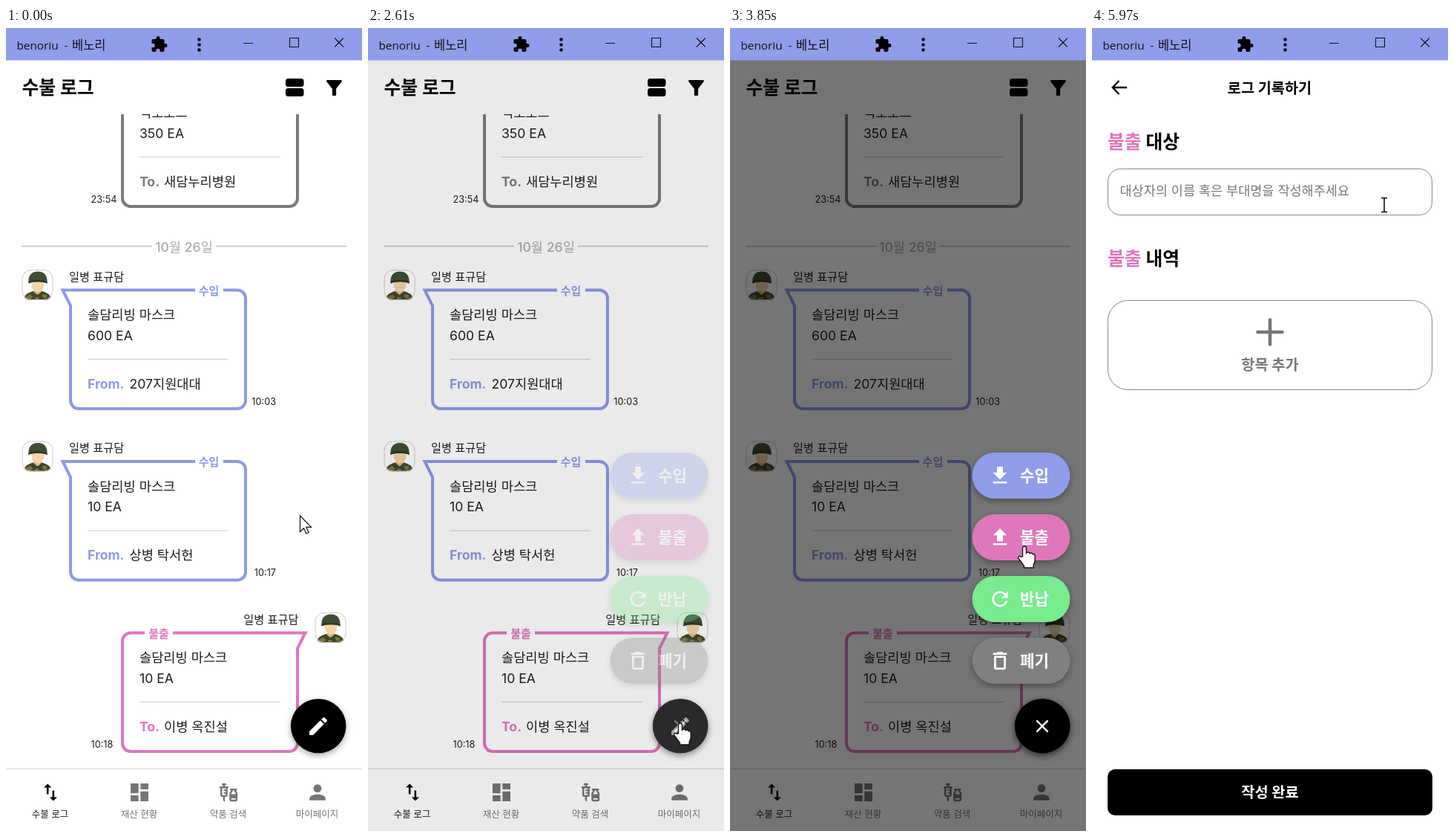
An HTML page that plays this animation: 480 by 1080 pixels, repeating every 6 s.

```html
<!DOCTYPE html>
<html lang="ko">
<head>
<meta charset="utf-8">
<style>
html, body { margin: 0; width: 100%; height: 100%; overflow: hidden; background: #fff }
svg { display: block; width: 480px; height: 1080px }
text { font-family: Inter, "Noto Sans CJK KR", "Noto Sans CJK", sans-serif; white-space: pre }
.win { font-family: "Open Sans", "Noto Sans CJK KR", "Noto Sans CJK", sans-serif }
.raised { filter: drop-shadow(0 3px 4px rgba(0, 0, 0, .35)) }
.line { fill: none }
</style>
</head>
<body>
<svg id="stage" viewBox="0 0 480 1080"></svg>
<script>
const BLUE = '#8c9ae8', PINK = '#e075bf', GRAY = '#7b7b7b', INK = '#1c1c1c';

const ICON = {
  puzzle: 'M20.5 11H19V7c0-1.1-.9-2-2-2h-4V3.5a2.5 2.5 0 0 0-5 0V5H4c-1.1 0-2 .9-2 2v3.8h1.5a2.7 2.7 0 0 1 0 5.4H2V20c0 1.1.9 2 2 2h3.8v-1.5a2.7 2.7 0 0 1 5.4 0V22H17c1.1 0 2-.9 2-2v-4h1.5a2.5 2.5 0 0 0 0-5z',
  filter: 'M4.25 5.61C6.27 8.2 10 13 10 13v6c0 .55.45 1 1 1h2c.55 0 1-.45 1-1v-6s3.72-4.8 5.74-7.39A1 1 0 0 0 18.95 4H5.04a1 1 0 0 0-.79 1.61z',
  swap: 'M16 17V10h-2v7h-3l4 4 4-4zM9 3L5 7h3v7h2V7h3z',
  board: 'M3 13h8V3H3zm0 8h8v-6H3zm10 0h8V11h-8zm0-18v6h8V3z',
  vaccine: 'M11 5.5H8V4h.5a1 1 0 0 0 0-2h-3a1 1 0 0 0 0 2H6v1.5H3a1 1 0 0 0 0 2V15c0 1.1.9 2 2 2h1v4l2 1.5V17h1c1.1 0 2-.9 2-2V7.5a1 1 0 0 0 0-2zM9 9H7.25a.75.75 0 0 0 0 1.5H9V12H7.25a.75.75 0 0 0 0 1.5H9V15H5V7.5h4zM20.5 10.5V10a1 1 0 0 0 0-2h-6a1 1 0 0 0 0 2v.5c0 .5-1.5 1.2-1.5 3V20c0 1.1.9 2 2 2h5c1.1 0 2-.9 2-2v-6.5c0-1.8-1.5-2.5-1.5-3zM16.5 10.5V10h2v.5c0 1.6 1.5 2 1.5 3V14h-5v-.5c0-1 1.5-1.4 1.5-3zM15 20v-1.5h5V20z',
  person: 'M12 12a4 4 0 1 0 0-8 4 4 0 0 0 0 8zm0 2c-2.67 0-8 1.34-8 4v2h16v-2c0-2.66-5.33-4-8-4z',
  pencil: 'M3 17.25V21h3.75L17.81 9.94l-3.75-3.75zM20.71 7.04a1 1 0 0 0 0-1.41l-2.34-2.34a1 1 0 0 0-1.41 0l-1.83 1.83 3.75 3.75z',
  close: 'M19 6.4L17.6 5 12 10.6 6.4 5 5 6.4l5.6 5.6L5 17.6 6.4 19l5.6-5.6 5.6 5.6 1.4-1.4-5.6-5.6z',
  down: 'M19 9h-4V3H9v6H5l7 7zM5 18v2h14v-2z',
  up: 'M9 16h6v-6h4l-7-7-7 7h4zM5 18h14v2H5z',
  redo: 'M17.65 6.35A8 8 0 1 0 19.73 14h-2.08A6 6 0 1 1 12 6c1.66 0 3.14.69 4.22 1.78L13 11h7V4z',
  trash: 'M6 19c0 1.1.9 2 2 2h8c1.1 0 2-.9 2-2V7H6zM8 9h8v10H8zm7.5-5l-1-1h-5l-1 1H5v2h14V4z'
};

// Text placed by its vertical centre
const text = (s, x, y, size, fill = INK, weight = 400, anchor = 'start', cls = '') =>
  `<text class="${cls}" x="${x}" y="${y + size * .37}" font-size="${size}" fill="${fill}" font-weight="${weight}" text-anchor="${anchor}">${s}</text>`;
const icon = (name, x, y, scale, fill) =>
  `<path d="${ICON[name]}" fill="${fill}" fill-rule="evenodd" transform="translate(${x} ${y}) scale(${scale}) translate(-12 -12)"/>`;
const rect = (x, y, w, h, fill, r = 0, more = '') =>
  `<rect x="${x}" y="${y}" width="${w}" height="${h}" rx="${r}" fill="${fill}" ${more}/>`;
const line = (d, color, width, more = '') =>
  `<path class="line" d="${d}" stroke="${color}" stroke-width="${width}" ${more}/>`;

const avatar = (x, y) => `<g transform="translate(${x} ${y})">
  <g clip-path="url(#round)">
    ${rect(0, 0, 42, 41, '#fff')}
    <path d="M3 41c0-7 3-9 12-12h12c9 3 12 5 12 12z" fill="#3c4729"/>
    <path d="M5 37l6-4 4 4-5 4zM27 33l7 1-1 5-5-1zM18 37h5v4h-6z" fill="#82713f"/>
    <path d="M16 25h10v5l-5 4-5-4z" fill="#dfb98a"/>
    <ellipse cx="21.5" cy="20" rx="8.5" ry="10" fill="#f3d5a8"/>
    <path d="M9 18.500C8 8 13 2.500 21.500 2.500S35 8 34 18.500c-7-3-18-3-25 0z" fill="#3f4d35"/>
    <path d="M9 18.500c7-3 18-3 25 0V16c-7-3-18-3-25 0z" fill="#2d3826"/>
  </g>
  ${rect(.5, .5, 41, 40, 'none', 12, 'stroke="#ccc"')}
</g>`;

// Speech bubble; the outgoing kind is mirrored to the right
function bubble(dy, color, label, name, item, count, who, time, out) {
  const x = out ? 180 : 110;
  return `<g transform="translate(0 ${dy})">
    ${line('M255 352.5H76.5L87 373.5V501a11 11 0 0 0 11 11H312a11 11 0 0 0 11-11V363.5a11 11 0 0 0-11-11H293', color, 4,
      `stroke-miterlimit="6" ${out ? 'transform="matrix(-1 0 0 1 480 0)"' : ''}`)}
    ${text(label, out ? 206 : 273.5, 353, 15, color, 700, 'middle')}
    ${text(name, out ? 394.5 : 85, 334, 15.2, INK, 400, out ? 'end' : 'start')}
    ${avatar(out ? 416.5 : 21.5, 325)}
    ${text(item, x, 385.5, 17.6)}
    ${text(count, x, 413, 17.6)}
    ${line(`M${x} 445.5h190`, '#ccc', 1.2)}
    ${text(out ? 'To.' : 'From.', x, 478, 17.6, color, 700)}
    ${text(who, x + (out ? 33 : 56.5), 478, 17.6)}
    ${text(time, out ? 114.5 : 364, 502, 12.7, INK, 400, out ? 'start' : 'end')}
  </g>`;
}

const disc = (fill, more = '') =>
  `<ellipse cx="421.2" cy="938.7" rx="37.3" ry="36.5" fill="${fill}" ${more}/>`;
const fab = (name, scale, extra = '') =>
  `<g class="raised">${disc('#000')}</g>${extra}${icon(name, 421, 939, scale, '#fff')}`;

const menu = [['down', '수입', '#8f9dea'], ['up', '불출', '#de78ba'], ['redo', '반납', '#78ec8e'], ['trash', '폐기', '#808080']]
  .map(([name, label, color], i) => {
    const y = 602 + 83 * i;
    return `<g class="raised">${rect(326.5, y - 31, 132, 62, color, 31)}</g>
      ${icon(name, 364, y, 1.32, '#fff')}${text(label, 391, y, 21.2, '#fff', 700)}`;
  }).join('');

const nav = [['swap', '수불 로그', 1.28], ['board', '재산 현황', 1.33], ['vaccine', '약품 검색', 1.22], ['person', '마이페이지', 1.35]]
  .map(([name, label, scale], i) => {
    const x = 59.5 + 120 * i;
    return icon(name, x + .5, 1028, scale, i ? '#757575' : '#000') +
      text(label, x, 1057, 12.5, i ? '#757575' : INK, 400, 'middle');
  }).join('');

const logPage = `
  ${rect(0, 43, 480, 1037, '#fff')}
  <g clip-path="url(#list)">
    ${bubble(-272, GRAY, '', '', '덕초모드', '350 EA', '새담누리병원', '23:54', true)}
    ${line('M21 293.5H197M283 293.5H459', '#ccc', 2)}
    ${text('10월 26일', 240, 294, 17.6, '#aaa', 500, 'middle')}
    ${bubble(0, BLUE, '수입', '일병 표규담', '솔담리빙 마스크', '600 EA', '207지원대대', '10:03')}
    ${bubble(230.5, BLUE, '수입', '일병 표규담', '솔담리빙 마스크', '10 EA', '상병 탁서헌', '10:17')}
    ${bubble(461, PINK, '불출', '일병 표규담', '솔담리빙 마스크', '10 EA', '이병 옥진설', '10:18', true)}
  </g>
  ${text('수불 로그', 21.5, 80, 24.8, '#000', 700)}
  ${rect(377, 68, 24.5, 11, '#000', 3.5)}${rect(377, 81, 24.5, 11, '#000', 3.5)}
  ${icon('filter', 442.5, 80.5, 1.32, '#000')}
  ${line('M0 996.5H480', '#ccc', 1)}${nav}
  ${fab('pencil', 1.33, disc('#fff', 'id="splash"'))}`;

const section = (label, y) =>
  text(`<tspan fill="${PINK}">불출</tspan> ${label}`, 21, y, 24.8, '#000', 700);

const formPage = `
  ${rect(0, 43, 480, 1037, '#fff')}
  ${line('M47 80H28M36.5 71L27.8 80L36.5 89', '#000', 2.4)}
  ${text('로그 기록하기', 239.5, 80.5, 19.7, '#000', 700, 'middle')}
  ${section('대상', 153)}
  ${rect(21.5, 189.5, 437, 62, '#fff', 17, 'stroke="#888"')}
  ${text('대상자의 이름 혹은 부대명을 작성해주세요', 37.5, 219, 17.5, '#777')}
  ${section('내역', 310)}
  ${rect(21.5, 366.5, 437, 120, '#fff', 27, 'stroke="#888"')}
  ${line('M223.5 409H256.5M240 392.5V425.5', '#777', 4.6, 'stroke-linecap="round"')}
  ${text('항목 추가', 240, 452.5, 19.8, '#777', 700, 'middle')}
  ${rect(21, 997, 438, 62, '#000', 10)}
  ${text('작성 완료', 240, 1028, 19.8, '#fff', 700, 'middle')}`;

const titleBar = `
  ${rect(0, 0, 480, 43.5, '#8f9dea')}
  ${text('benoriu  -', 14.5, 23, 15.3, '#111', 400, 'start', 'win')}
  ${text('베노리', 89, 23, 16.5, '#111', 400, 'start', 'win')}
  ${icon('puzzle', 206.5, 22, 1, '#000')}
  ${[15.5, 22.5, 29.5].map(y => `<circle cx="260.5" cy="${y}" r="2.3"/>`).join('')}
  ${line('M320 20.5H333M382.5 13.5H394.5V25.5H382.5ZM443 13.5L455 25.5M455 13.5L443 25.5', '#111', 1.1)}`;

const cursors = `
  <path id="arrow" d="M0 0V21.5L5 16.8 8.3 24 11.6 22.5 8.3 15.4H15Z" fill="#fff" stroke="#111" stroke-width="1.2"/>
  <path id="hand" d="M-2.5 14V2.5a2.5 2.5 0 0 1 5 0V9c1-1.5 4-1.5 4.6.6 1.2-1 3.8-.6 4.2 1.2 1.4-.6 2.9.2 2.9 2V19c0 3-1 4-2 6v4H-.5V26.5C-3 23-5 20-8 16.5c-1.5-2 1.5-4 3.5-2.2z" fill="#fff" stroke="#111" stroke-width="1.4"/>
  <path id="beam" class="line" d="M-4-9.5h3l1 1 1-1h3M0-9V9M-4 9.5h3l1-1 1 1h3" stroke="#000" stroke-width="1.5"/>`;

const $ = id => document.getElementById(id);
$('stage').innerHTML = `
  <clipPath id="round"><rect width="42" height="41" rx="12"/></clipPath>
  <clipPath id="list"><rect y="116" width="480" height="880"/></clipPath>
  <g id="log">${logPage}
    <g id="shade">${rect(0, 43, 480, 1037, '#000')}</g>
    <g id="menu">${menu}${fab('close', 1.2)}</g>
  </g>
  <g id="scrim">${rect(0, 43, 480, 1037, '#000')}</g>
  <g id="form">${formPage}</g>
  ${titleBar}
  <g id="cursor">${cursors}</g>`;

const clamp = v => Math.min(1, Math.max(0, v));
const span = (t, from, to) => clamp((t - from) / (to - from));

function bezier(x1, y1, x2, y2) {
  const at = (a, b, u) => 3 * a * u * (1 - u) ** 2 + 3 * b * u * u * (1 - u) + u ** 3;
  return x => {
    if (x <= 0 || x >= 1) return clamp(x);
    let lo = 0, hi = 1;
    for (let i = 0; i < 24; i++) {
      const mid = (lo + hi) / 2;
      if (at(x1, x2, mid) < x) lo = mid; else hi = mid;
    }
    return at(y1, y2, lo);
  };
}
const ease = bezier(.25, .1, .25, 1);
const zoomIn = bezier(.05, 0, .1333, .06), zoomOut = bezier(.2083, .82, .25, 1);
const zoom = p => p < 1 / 6 ? .4 * zoomIn(p * 6) : .4 + .6 * zoomOut((p - 1 / 6) * 1.2);

const OPEN = 2521, PUSH = 4419;
// Pointer stops: time, x, y
const stops = [[1450, 396.5, 656], [2050, 421, 935], [3000, 421, 935], [3600, 397, 697],
  [4380, 397, 697], [4500, 397.5, 688], [5100, 397.5, 688], [5700, 394, 238]];

function pointer(t) {
  let [, x, y] = stops[0];
  for (let i = 1; i < stops.length; i++) {
    const [t0, x0, y0] = stops[i - 1], [t1, x1, y1] = stops[i];
    if (t < t0) break;
    const k = span(t, t0, t1), s = k * k * (3 - 2 * k);
    x = x0 + (x1 - x0) * s;
    y = y0 + (y1 - y0) * s;
  }
  return [x, y];
}

function cursorKind(t, x, y) {
  if (t >= PUSH) return y > 189 && y < 252 ? 'beam' : y > 366 && y < 487 ? 'hand' : 'arrow';
  const onFab = Math.hypot(x - 421, y - 939) < 37;
  const onMenu = t > OPEN && x > 327 && y > 571 && y < 882 && (y - 571) % 83 < 62;
  return onFab || onMenu ? 'hand' : 'arrow';
}

const scaleAt = s => `translate(240 561.5) scale(${s}) translate(-240 -561.5)`;
const fade = (id, v) => {
  $(id).setAttribute('opacity', v);
  $(id).setAttribute('display', v > 0 ? 'inline' : 'none');
};

function draw(t) {
  const shown = span(t, OPEN, OPEN + 300);
  fade('splash', .26 * span(t, OPEN, OPEN + 80));
  fade('shade', .54 * shown * ease(shown));
  fade('menu', shown);

  const p = span(t, PUSH, PUSH + 300), z = zoom(p);
  $('log').setAttribute('transform', scaleAt(1 + .05 * z));
  $('form').setAttribute('transform', scaleAt(.85 + .15 * z));
  fade('scrim', .6 * span(p, .2075, .4175));
  fade('form', span(p, .125, .25));

  const [x, y] = pointer(t), kind = cursorKind(t, x, y);
  $('cursor').setAttribute('transform', `translate(${x} ${y})`);
  for (const id of ['arrow', 'hand', 'beam']) $(id).setAttribute('display', id === kind ? 'inline' : 'none');
}

const start = performance.now();
function tick() {
  draw((performance.now() - start) % 6000);
  requestAnimationFrame(tick);
}
tick();
</script>
</body>
</html>
```
